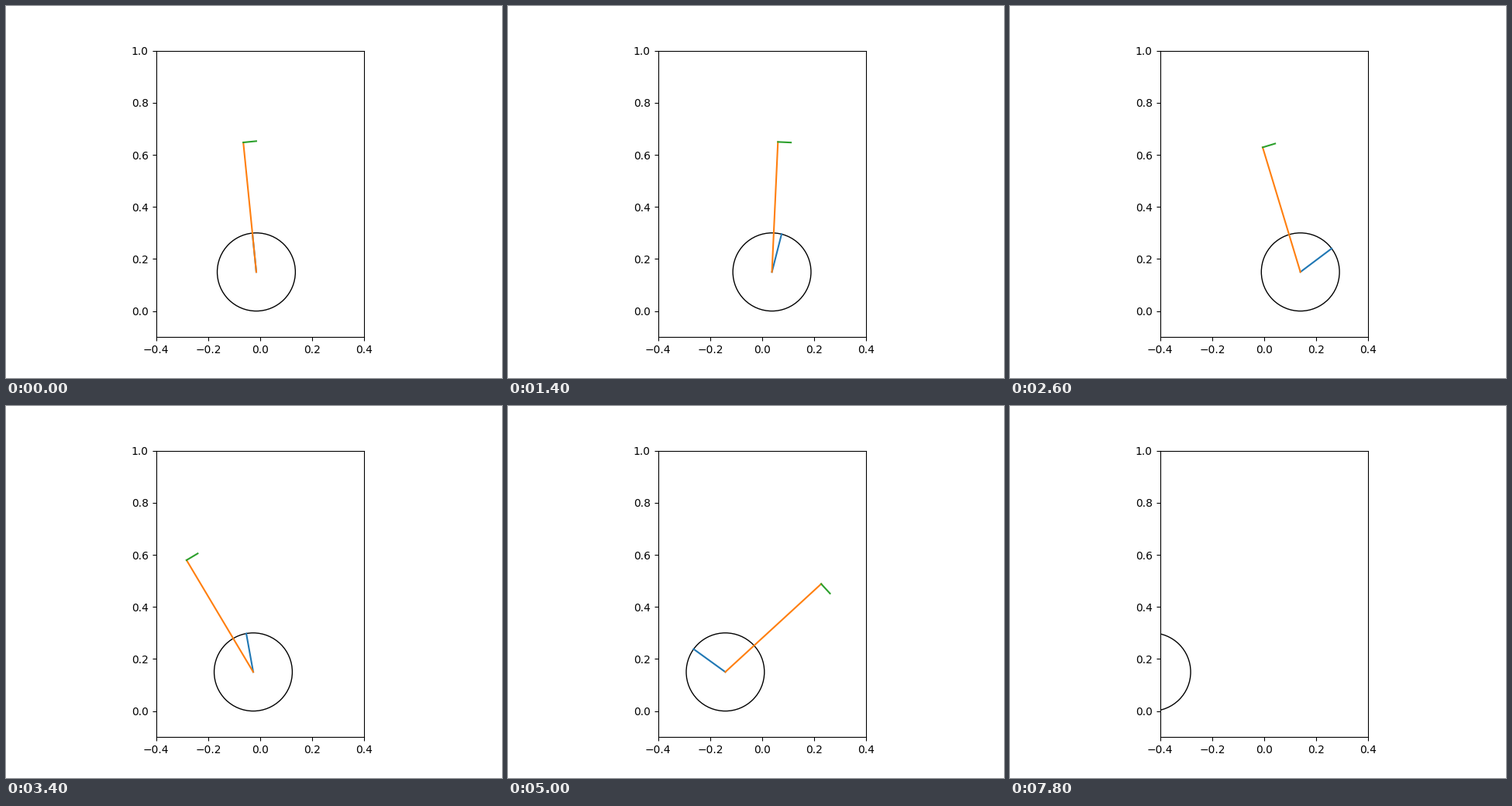
Recreate the animation shown at these times as a matplotlib script. Size 640x480 px, loop 8000 ms.

```python
import numpy as np
import matplotlib.pyplot as plt
from matplotlib.animation import FuncAnimation

FRAMES, INTERVAL = 40, 200
RADIUS, POLE, ARM = 0.15, 0.5, 0.05

# Key poses: frame, wheel position, pole tilt (clockwise from upright)
KEYS = [
    (0, -0.015, -0.1), (3, -0.028, -0.04), (7, 0.0374, 0.046),
    (13, 0.139, -0.294), (18, -0.1, -0.5), (21, -0.3125, -0.0387),
    (25, -0.1417, 0.828), (29, 0.57, 0.6), (33, 0.7904, -1.374),
    (36, 0.305, -2.02), (39, -0.4325, -2.5),
]


def spline(t, y):
    """Return a natural cubic spline through the points (t, y)."""
    h, n = np.diff(t), len(t)
    slope = np.diff(y) / h
    a, b = np.eye(n), np.zeros(n)
    for i in range(1, n - 1):
        a[i, i - 1:i + 2] = h[i - 1], 2 * (h[i - 1] + h[i]), h[i]
        b[i] = 6 * (slope[i] - slope[i - 1])
    m = np.linalg.solve(a, b)

    def value(at):
        i = min(np.searchsorted(t, at, side="right") - 1, n - 2)
        u, v, w = at - t[i], t[i + 1] - at, h[i]
        return ((m[i] * v**3 + m[i + 1] * u**3) / (6 * w)
                + (y[i] / w - m[i] * w / 6) * v
                + (y[i + 1] / w - m[i + 1] * w / 6) * u)

    return value


key_times, key_x, key_tilt = np.transpose(KEYS)
wheel_x = spline(key_times, key_x)
tilt = spline(key_times, key_tilt)

fig, ax = plt.subplots(figsize=(6.4, 4.8), dpi=100)
ax.set_aspect("equal")
ax.set_xlim(-0.4, 0.4)
ax.set_ylim(-0.1, 1.0)

wheel = plt.Circle((0, RADIUS), RADIUS, fill=False, ec="black", lw=1)
ax.add_patch(wheel)
spoke, pole, arm = (ax.plot([], [], color=c, lw=1.5)[0]
                    for c in ("tab:blue", "tab:orange", "tab:green"))


def direction(angle):
    return np.array([np.sin(angle), np.cos(angle)])


def segment(line, start, end):
    line.set_data(*zip(start, end))


def update(frame):
    x, angle = wheel_x(frame), tilt(frame)
    hub = np.array([x, RADIUS])
    tip = hub + POLE * direction(angle)
    wheel.center = hub
    # The wheel rolls without slipping
    segment(spoke, hub, hub + RADIUS * direction(x / RADIUS))
    segment(pole, hub, tip)
    segment(arm, tip, tip + ARM * direction(angle + np.pi / 2))
    return wheel, spoke, pole, arm


anim = FuncAnimation(fig, update, frames=FRAMES, interval=INTERVAL,
                     repeat=True, repeat_delay=0)
plt.show()
```
